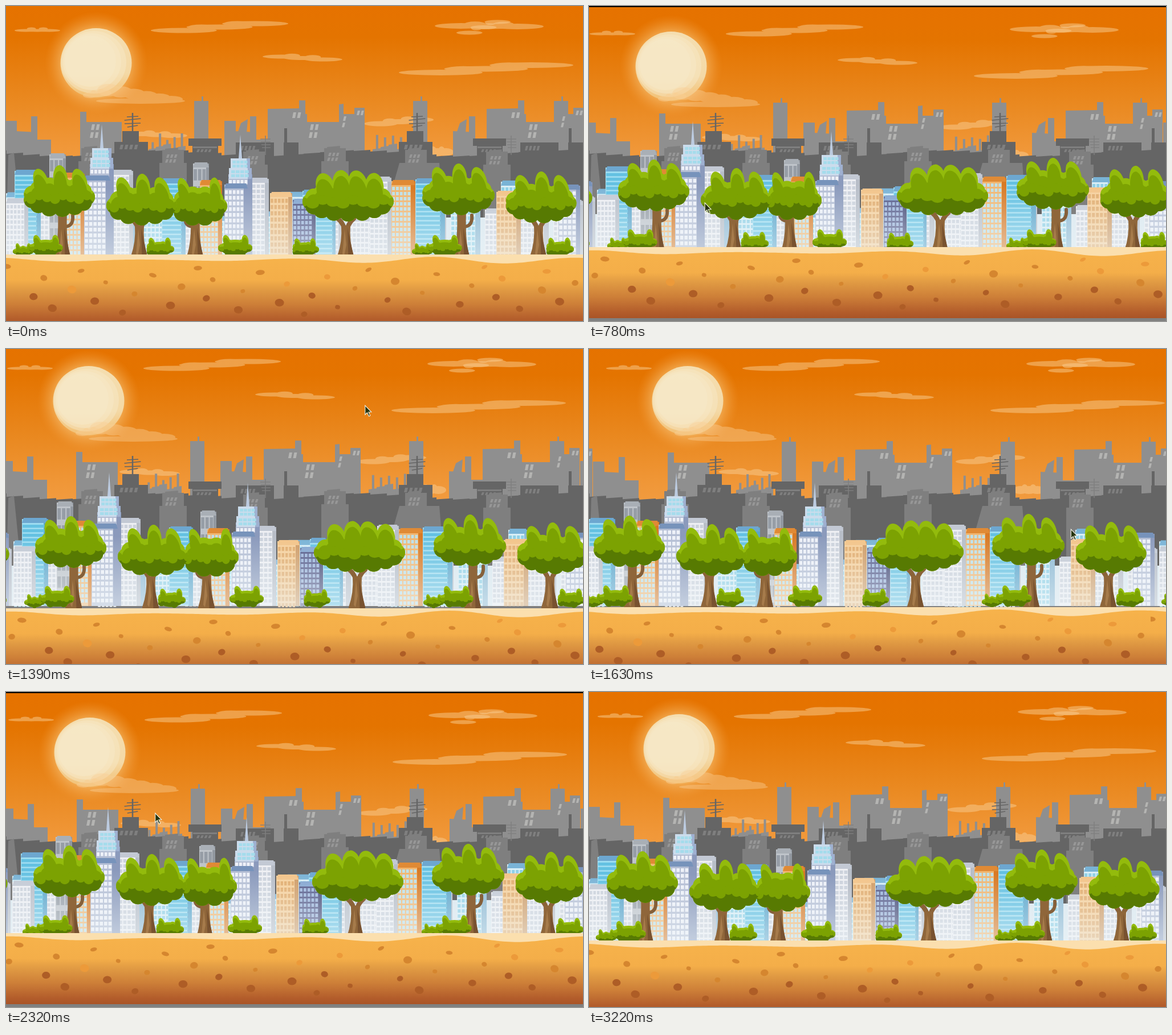
An HTML page with a canvas for the animation above (3690 ms loop, 1012 px wide and 554 px high).

```html
<!DOCTYPE html>
<html lang="en">
<head>
<meta charset="utf-8">
<title>Parallax city</title>
<style>
html, body { margin: 0; width: 100%; height: 100%; overflow: hidden; background: #808080; }
canvas { display: block; width: 1012px; height: 554px; }
</style>
</head>
<body>
<canvas id="stage" width="1012" height="554"></canvas>
<script>
const W = 1012, H = 554, TILE = 1015, PAD = 80, LOOP = 3690, TAU = Math.PI * 2;
const stage = document.getElementById('stage').getContext('2d');
let c, seed;

const rnd = () => (seed = seed * 16807 % 2147483647) / 2147483647;
const mix = (a, b, u) => a + (b - a) * u;

// Paints one horizontally repeating layer into its own canvas.
function layer(depth, paint) {
  const img = document.createElement('canvas');
  img.width = W + 2 * PAD;
  img.height = H + 2 * PAD;
  c = img.getContext('2d');
  for (const shift of [-TILE, TILE, 0]) {
    seed = 4242;
    c.setTransform(1, 0, 0, 1, PAD + shift, PAD);
    paint();
  }
  return { img, depth };
}

function rect(x, y, w, h, fill) {
  c.fillStyle = fill;
  c.fillRect(x, y, w, h);
}

function poly(pts, fill) {
  c.beginPath();
  for (let i = 0; i < pts.length; i += 2) c.lineTo(pts[i], pts[i + 1]);
  c.closePath();
  c.fillStyle = fill;
  c.fill();
}

// One fill for all ovals, so overlaps stay even.
function ovals(list, fill) {
  c.beginPath();
  for (const [x, y, rx, ry, turn = 0] of list) {
    c.moveTo(x + rx * Math.cos(turn), y + rx * Math.sin(turn));
    c.ellipse(x, y, rx, ry, turn, 0, TAU);
  }
  c.fillStyle = fill;
  c.fill();
}

const oval = (x, y, rx, ry, fill, turn) => ovals([[x, y, rx, ry, turn]], fill);

function line(x0, y0, x1, y1, color, width) {
  c.beginPath();
  c.moveTo(x0, y0);
  c.lineTo(x1, y1);
  c.strokeStyle = color;
  c.lineWidth = width;
  c.stroke();
}

function fade(gradient, ...stops) {
  stops.forEach(([at, color]) => gradient.addColorStop(at, color));
  return gradient;
}

const down = (y0, y1, ...stops) => fade(c.createLinearGradient(0, y0, 0, y1), ...stops);

// Streak of overlapping ovals from one end to the other.
function wisp(x0, y0, x1, y1, thick = 4.5) {
  const w = x1 - x0, list = [];
  for (let i = 0; i < 5; i++) {
    const u = i / 4, rx = w * (.17 + .07 * (i % 2 ? -1 : 1));
    list.push([mix(x0 + w * .24, x1 - w * .24, u), mix(y0, y1, u) + (i % 2 ? -2 : 1), rx, thick]);
  }
  ovals(list, 'rgba(250,205,145,.5)');
}

function paintSky() {
  rect(0, -4, TILE, 404, down(-4, 290, [0, '#e67200'], [.2, '#e47400'], [.6, '#ea8a22'], [.85, '#f09738'], [1, '#f29d42']));
  const glow = fade(c.createRadialGradient(158, 100, 58, 158, 100, 90),
    [0, 'rgba(248,196,120,.65)'], [.5, 'rgba(244,172,85,.35)'], [1, 'rgba(240,150,50,0)']);
  oval(158, 100, 90, 90, glow);
  oval(158, 100, 62.5, 61, down(39, 161, [0, '#f5deb0'], [.65, '#f4d9a6'], [1, '#f2bf72']));
  for (let i = 0; i < 3; i++) oval(154 - i * 3, 99 - i, 57 - i * 6, 55 - i * 5, 'rgba(246,232,202,.45)');
  const puffs = [[236, 167, 78, 5]];
  for (let i = 0; i < 6; i++) puffs.push([180 + i * 22, 148 + i * 3.2, 20, 11 - i]);
  ovals(puffs, 'rgba(248,206,148,.42)');
  wisp(135, 156, 185, 152, 5);
  wisp(15, 42, 95, 42, 2.5);
  wisp(254, 42, 495, 30);
  wisp(450, 88, 590, 93, 3.5);
  wisp(752, 34, 943, 35, 5);
  wisp(790, 46, 885, 27, 3.5);
  wisp(689, 116, 995, 103, 5);
  wisp(628, 206, 750, 199);
  wisp(212, 224, 318, 227, 4);
  wisp(728, 256, 785, 256, 7);
}

const FAR = '#8f8f8f', DARK = '#656565', GRAY = '#7f7f7f', FLOOR = 400;

// Building with a slightly tilted roof.
const slab = (x, y, w, fill, tilt = 0) => poly([x, FLOOR, x, y + tilt, x + w, y, x + w, FLOOR], fill);

function slits(x, y, cols, rows, fill, w = 5, h = 10) {
  for (let i = 0; i < cols; i++)
    for (let j = 0; j < rows; j++) {
      const a = x + i * w * 1.7 - j * 2, b = y + j * h * 1.4;
      poly([a + 1, b, a + w + 1, b, a + w - 1, b + h, a - 1, b + h], fill);
    }
}

// Broken walls and pillars rising to the right.
function stumps(x, w, y) {
  for (let i = 0; i < 5; i++) {
    const a = x + i * w / 5;
    slab(a, y - i % 3 * 4, w / 5 + 1, FAR, 2);
    slab(a + w / 12, y - 10 - rnd() * 16, 4, FAR);
  }
}

function paintFar() {
  const pale = '#b4b4b2';
  for (const x of [-384, 0, 384]) {
    const whole = x >= 0, top = whole ? 166 : 186;
    slab(330 + x, 167, 25, FAR);
    slab(343 + x, 159, 3, FAR);
    if (x < 384) slab(383 + x, 202, 20, FAR);
    slab(400 + x, 222, 38, FAR, -2);
    slab(428 + x, 194, 11, FAR);
    slab(437 + x, 235, 26, FAR);
    slab(514 + x, top, 11, FAR);
    slab(514 + x, top + 24, 14, FAR);
    slab(525 + x, 204, 62, FAR);
    slits(534 + x, 208, 2, 2, pale);
    if (!whole) continue;
    poly([406 + x, 224, 412 + x, 206, 424 + x, 199, 422 + x, 224], FAR);
    slab(459 + x, 180, 56, FAR, 1);
    slab(584 + x, 172, 8, FAR, 1);
    slab(585 + x, 190, 28, FAR);
    slab(611 + x, 179, 18, FAR);
    slits(503 + x, 187, 2, 1, pale);
    slits(592 + x, 194, 1, 2, pale, 4, 8);
    slits(616 + x, 184, 2, 1, pale, 4, 8);
  }
  stumps(250, 64, 250);
  stumps(643, 70, 250);
}

// Tower carrying a radio mast.
function station(x) {
  slab(x - 32, 239, 59, DARK);
  slab(x - 18, 220, 29, DARK);
  line(x, 188, x, 221, DARK, 2.5);
  for (let i = 0; i < 4; i++) {
    const r = 10 + 5 * Math.sin(i * 1.1), y = 194 + i * 6;
    line(x - r, y + 1, x + r, y - i % 2 * 2, DARK, 1.7);
  }
  slits(x - 22, 244, 4, 1, GRAY, 5, 8);
}

function ruin(x, y, w) {
  slab(x, y + 4, w, GRAY);
  slab(x + 5, y, w * .6, GRAY, 2);
  slab(x - 5, y + 27, w + 10, GRAY);
  slits(x + 8, y + 12, 3, 2, '#979797', 4, 6);
}

function paintMid() {
  for (let x = 0; x < TILE; x += 29) slab(x, 258 + 5 * Math.sin(x / 55), 30, DARK, 2);
  for (const x of [0, 499]) {
    station(222 + x);
    slab(327 + x, 245, 45, DARK);
    rect(320 + x, 233, 58, 13, DARK);
    rect(328 + x, 247, 42, 3, GRAY);
    slits(335 + x, 252, 4, 1, GRAY, 4, 5);
    slab(403 + x, 240, 67, DARK);
    slits(412 + x, 246, 4, 1, GRAY, 4, 8);
    slab(488 + x, 215, 5, DARK);
    slab(487 + x, 240, 26, DARK);
  }
  for (let i = 0; i < 6; i++) ruin(132 + i * 142, 246 + i % 3 * 3, 38);
  poly([0, FLOOR, 4, 262, 14, 258, 28, FLOOR], GRAY);
  poly([655, FLOOR, 690, 276, 760, 276, 770, FLOOR], GRAY);
  for (const x of [455, 886]) {
    line(x, 228, x, 262, GRAY, 1.5);
    for (let i = 0; i < 4; i++) line(x - 9 + i, 234 + i * 5, x + 9, 234 + i * 5, GRAY, 1.3);
  }
}

// Each palette: face, panes, shaded side, roof, row height.
const WHITE = ['#eeeff3', '#ccd2dc', '#b8bec8', '#c3c9d4', 9];
const LILAC = ['#b4bed4', '#eef1f8', '#8b9abc', '#7793bb', 10];
const CYAN = ['#9ddcf0', '#64c1e2', '#5aa5cb', '#6da7d0', 8];
const ORANGE = ['#f1b670', '#bfe0e8', '#d87a25', '#e08a35', 9];
const PEACH = ['#f6d09c', '#e2ac6d', '#cf9c66', '#f3c489', 11];
const VIOLET = ['#555b8a', '#9bb4da', '#454b77', '#83a5d0', 9];
const SKY = ['#d8eef6', '#8fd0e6', '#8db9d3', '#79b3d6', 9];
const STEEL = ['#bfc4ca', '#969da6', '#9298a0', '#a9afb6', 30];
const BASE = 443;

function tower(x, y, w, look) {
  const [face, pane, side, roof, step] = look, f = Math.round(w * .82);
  const cols = look === CYAN ? 1 : Math.round(f / 7), gap = f / cols;
  rect(x, y + 2, w, BASE - y - 2, side);
  rect(x, y + 2, f, BASE - y - 2, face);
  c.fillStyle = pane;
  for (let b = y + 12; b < BASE - 4; b += step)
    for (let i = 0; i < cols; i++) c.fillRect(x + i * gap + 1.2, b, cols > 1 ? gap - 2 : f, step * .66);
  poly([x, y + 9, x + 3, y, x + w - 3, y, x + w, y + 9], roof);
}

function spire(x, y) {
  poly([x - 3, y, x, y - 42, x + 3, y], '#bccbe0');
  tower(x - 21, y + 26, 42, LILAC);
  for (const [top, r] of [[0, 17], [17, 20]]) {
    rect(x - r, y + top, r * 2, 19, '#cbdcec');
    rect(x + r * .65, y + top, r * .35, 19, '#9fb0d0');
    for (const d of [4, 11]) for (let i = -2; i < 2; i++) rect(x + i * r * .4, y + top + d, r * .33, 5, '#a5dcec');
  }
}

function paintCity() {
  rect(0, 372, TILE, BASE - 372, '#dbe8ef');
  for (let i = 0; i < 17; i++) tower(i * 60, 326 + rnd() * 45, 52, rnd() < .6 ? WHITE : SKY);
  tower(76, 259, 29, STEEL);
  tower(15, 288, 46, CYAN);
  tower(98, 293, 40, ORANGE);
  tower(186, 288, 37, WHITE);
  spire(168, 250);
  tower(137, 298, 46, LILAC);
  tower(273, 303, 42, CYAN);
  tower(328, 275, 28, STEEL);
  tower(340, 306, 39, ORANGE);
  tower(423, 302, 38, WHITE);
  spire(411, 268);
  tower(383, 312, 41, LILAC);
  tower(0, 338, 39, WHITE);
  tower(520, 323, 30, CYAN);
  tower(503, 339, 41, VIOLET);
  tower(463, 327, 39, PEACH);
  tower(543, 352, 35, CYAN);
  tower(638, 300, 38, WHITE);
  tower(676, 306, 42, ORANGE);
  tower(718, 303, 52, CYAN);
  tower(868, 307, 34, SKY);
  tower(860, 325, 43, PEACH);
  tower(969, 314, 38, LILAC);
  c.globalCompositeOperation = 'source-atop';
  rect(0, 320, TILE, 125, down(320, 437, [0, 'rgba(240,247,250,0)'], [1, 'rgba(240,247,250,.55)']));
  c.globalCompositeOperation = 'source-over';
}

// Ring of lobes with taller fingers on top, in three tones.
function leaves(cx, top, w, h) {
  const r = h * .16, n = Math.max(2, Math.round(w / 42)), rim = Math.round(w / 10);
  const lobes = [[cx, top + h * .6, w / 2 - r * .6, h * .33]];
  for (let i = 0; i < rim; i++) {
    const a = TAU * i / rim;
    lobes.push([cx + (w / 2 - r) * Math.cos(a), top + h * (.61 + .22 * Math.sin(a)), r, r]);
  }
  for (let i = 0; i < n; i++) {
    const u = i / (n - 1) * 2 - 1;
    lobes.push([cx + w * (.27 * u + .02), top + h * (.27 + .06 * u * u), w * .1, h * .26, -.3 + i % 2 * .2]);
  }
  const shifted = lobes.map(([x, y, rx, ry, turn]) => [x, y + h * .11, rx * .9, ry, turn]);
  ovals(lobes, '#93bb0c');
  c.save();
  c.clip();
  ovals(shifted, '#7ca202');
  rect(cx - w, top + h * .65, w * 2, h, '#577a02');
  const fringe = [];
  for (let i = 0; i <= 9; i++) fringe.push([cx + w * (i / 9 - .5), top + h * (.62 + .04 * Math.sin(i * 2.1)), w * .07, h * .09]);
  ovals(fringe, '#7ca202');
  c.restore();
}

function limb(x0, y0, cx, cy, x1, y1, width, color) {
  c.beginPath();
  c.moveTo(x0, y0);
  c.quadraticCurveTo(cx, cy, x1, y1);
  c.strokeStyle = color;
  c.lineWidth = width;
  c.stroke();
}

// Branch: -1 left, 1 right, 0 forked.
function tree(cx, top, w, branch) {
  const x = cx + (branch ? branch * 6 : -4);
  c.lineCap = 'round';
  if (branch) limb(x, 388, x + branch * 20, 390, x + branch * 18, 368, 6, '#85603a');
  for (const side of branch ? [] : [-1, 1]) limb(x, 402, x + side * 3, 382, x + side * 14, 374, 8, '#8a6339');
  c.beginPath();
  c.moveTo(x - 8, branch ? 362 : 386);
  c.quadraticCurveTo(x - 6, 415, x - 15, 440);
  c.lineTo(x - 15, 462);
  c.lineTo(x + 14, 462);
  c.lineTo(x + 14, 440);
  c.quadraticCurveTo(x + 6, 415, x + 8, branch ? 362 : 386);
  c.fillStyle = '#8f663a';
  c.fill();
  poly([x + 3, 390, x + 7, 410, x + 14, 440, x + 14, 462, x + 5, 462], '#785230');
  poly([x - 2, 392, x + 1, 420, x - 3, 440, x - 6, 436], '#a67b4b');
  leaves(cx, top, w, 93);
}

function bush(cx, w) {
  const h = w * .66 + 3;
  leaves(cx, 442 - h, w, h);
}

function paintTrees() {
  tree(338, 295, 100, -1);
  tree(238, 294, 124, 0);
  tree(93, 279, 126, 1);
  tree(600, 287, 160, 0);
  tree(793, 276, 128, 1);
  tree(938, 290, 125, 0);
  for (const x of [30, 730]) {
    bush(x, 36);
    bush(x + 39.5, 60);
  }
  bush(269, 52);
  bush(402, 60);
  bush(524, 50);
  bush(970, 52);
}

const dune = x => 447 + (3.5 + 2.5 * Math.cos(TAU * (x - 800) / TILE)) * Math.cos(TAU * 4 * (x - 115) / TILE);

function paintGround() {
  rect(0, 437, TILE, 125, down(437, 562, [0, '#f7b34b'], [.36, '#f4ae49'], [.5, '#e09a43'], [.7, '#cd7f38'], [.92, '#b25c2b'], [1, '#a95427']));
  const edge = [0, 437];
  for (let x = 0; x <= TILE; x += 5) edge.push(x, dune(x));
  poly([...edge, TILE, 437], '#fbdfae');
  const count = 42;
  for (let i = 0; i < count; i++) {
    const x = (i + rnd()) * TILE / count, y = 458 + i * .618 % 1 * 86;
    const r = 3.5 + 4.5 * rnd(), flat = y < 475 ? .55 : .85;
    const tone = y > 508 ? '#ae5d26' : rnd() < .25 ? '#ec9a3a' : '#d5862f';
    oval(x, y, r, r * flat, tone, rnd() - .5);
  }
}

const layers = [
  layer(-.5, paintSky), layer(-.25, paintFar), layer(0, paintMid),
  layer(.5, paintCity), layer(.75, paintTrees), layer(1, paintGround)
];

// First change, last change, number of changes.
const RUNS = [[70, 560, 7], [630, 1090, 7], [1170, 1630, 7], [1700, 2170, 7], [2250, 2770, 8], [2850, 3220, 6]];
const TICKS = [0];
for (const [a, b, n] of RUNS)
  for (let i = 0; i < n; i++) TICKS.push(Math.floor(mix(a, b, i / (n - 1)) / 10 + 1e-6) * 10);

// Both the pointer and the scene circle; the scene trails behind.
// Time, scene radius, scene angle, pointer radius, pointer angle.
const ORBIT = [
  [0, 0, -150, 2, -130],
  [780, .816, -46, .85, -24],
  [1090, .988, 8, .95, 50],
  [1630, .995, 129, .893, 193],
  [2320, .748, 308, .703, 387],
  [2770, .955, 432, .987, 534],
  [3220, 0, 500, 2, 600]
];

// Smooth cubic through the keys.
function curve(keys, t, k) {
  const last = keys.length - 1;
  if (t >= keys[last][0]) return keys[last][k];
  let i = 0;
  while (t >= keys[i + 1][0]) i++;
  const slope = j => j < 1 || j >= last ? 0 : (keys[j + 1][k] - keys[j - 1][k]) / (keys[j + 1][0] - keys[j - 1][0]);
  const a = keys[i], b = keys[i + 1], d = b[0] - a[0], u = (t - a[0]) / d, v = 1 - u;
  return v * v * (1 + 2 * u) * a[k] + u * u * (1 + 2 * v) * b[k] + d * u * v * (v * slope(i) - u * slope(i + 1));
}

function orbit(t, k, rx, ry) {
  const r = curve(ORBIT, t, k), a = curve(ORBIT, t, k + 1) * TAU / 360;
  return [rx * r * Math.cos(a), ry * r * Math.sin(a)];
}

const arrow = new Path2D('M0 0V16L3.7 12.6 6.6 18.8 9 17.7 6.2 11.6 11 11.4Z');

function render(time) {
  const t = TICKS.filter(v => v <= time).pop();
  const [dx, dy] = orbit(t, 1, 48, 22), [px, py] = orbit(t, 3, 390, 200);
  rect(0, 0, W, H, '#808080');
  rect(0, 0, W, 40, '#000');
  for (const { img, depth } of layers) c.drawImage(img, Math.round(dx * depth) - PAD, Math.round(dy * depth) - PAD);
  c.save();
  c.translate(506 - px, 277 - py);
  c.fillStyle = '#26330c';
  c.fill(arrow);
  c.strokeStyle = '#f4f4e8';
  c.lineWidth = 1.1;
  c.stroke(arrow);
  c.restore();
}

c = stage;
const start = performance.now();
function loop() {
  render((performance.now() - start) % LOOP);
  requestAnimationFrame(loop);
}
loop();
</script>
</body>
</html>
```
